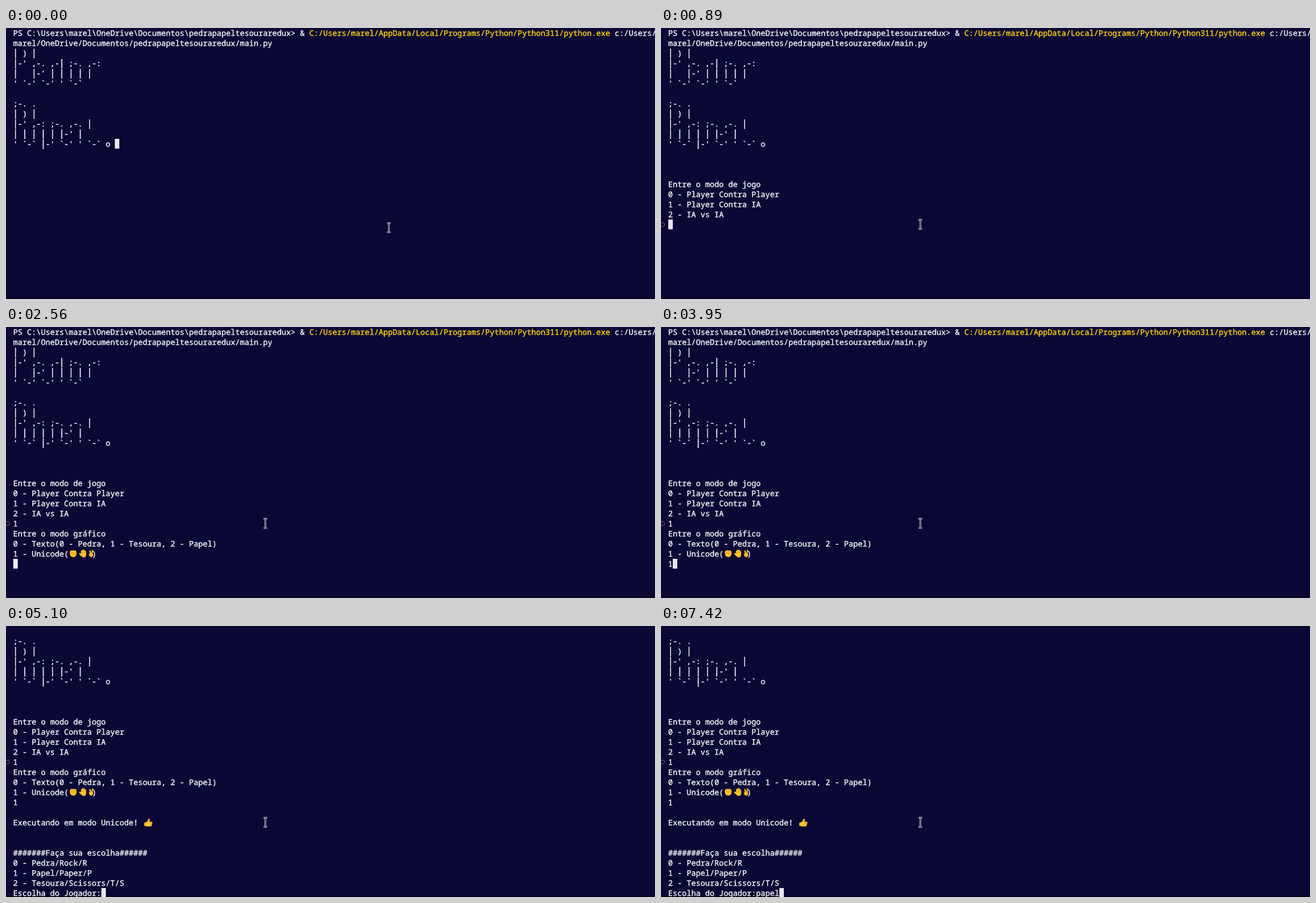
Write an HTML page that moves like this. It is 1157x484 px and loops after 8000 ms.

```html
<!DOCTYPE html>
<html lang="pt">
<head>
<meta charset="utf-8">
<title>Terminal</title>
<style>
  html, body { margin: 0; width: 100%; height: 100%; overflow: hidden; background: #0c0835; }
  svg { display: block; }
  text {
    font: 13.75px "Noto Sans Mono", "DejaVu Sans Mono", monospace;
    font-variant-ligatures: none;
    text-rendering: geometricPrecision;
    white-space: pre;
    fill: #f6f5fa;
    stroke: #f6f5fa;
    stroke-width: .4px;
  }
  text.bar { font-size: 16.5px; text-anchor: middle; }
  text.path { fill: #ffd40c; stroke: #ffd40c; }
  #caret text { fill: #0c0835; stroke: #0c0835; }
</style>
</head>
<body>
<svg id="stage" width="1157" height="484" viewBox="0 0 1157 484">
  <defs>
    <g id="fist">
      <path d="M2 6Q2 3.4 4.6 3H10.8Q13.6 3.2 13.8 6V9.6Q13.4 14.6 8.4 15Q3 14.8 2.2 10Z" fill="#ffc22e"/>
      <path d="M5 4V6.8M7.9 4V6.8M10.8 4V6.8M3.6 8.2H9.4Q10.4 10.2 8.2 10.8" fill="none" stroke="#d98a10" stroke-width=".8"/>
    </g>
    <g id="palm" fill="none" stroke="#ffc22e" stroke-width="2.6" stroke-linecap="round">
      <path d="M6.7 9V4.4M9 8V2.8M11.2 8V3.2M13.3 9.4V5.4M6 12L3.4 9"/>
      <path d="M5.4 8H14.6V11.2Q14 15.4 10.3 15.4Q7.4 15.4 5 12Z" fill="#ffc22e" stroke="none"/>
      <path d="M7.9 8V4.6M10.1 8V3.4M12.3 8.4V5" stroke="#d98a10" stroke-width=".6"/>
    </g>
    <g id="peace" fill="none" stroke="#ffc22e" stroke-width="2.3" stroke-linecap="round">
      <path d="M6 9L4.8 4M8.2 9L9.6 3"/>
      <path d="M3 9.6Q3 8.2 5 8.2H9Q10.8 8.4 10.6 11Q10 15 7 15Q3 14.4 3 9.6Z" fill="#ffc22e" stroke="none"/>
      <path d="M4 10.2H7.4Q8.4 11.4 6.6 12.4" stroke="#d98a10" stroke-width=".8"/>
    </g>
    <g id="thumb">
      <path d="M2.6 9.6L6 8.6Q9.4 6.4 10 3Q10.6 1.6 12 2.4Q13.6 3.8 11.8 7.4H15.8Q17.4 7.6 17.2 9.2L16 14.6Q15.4 16 13.8 16H7.6L2.6 14.8Z" fill="#ffc22e"/>
      <path d="M12.6 9.7H16.4M12.2 11.8H16M11.8 13.9H15.4" stroke="#d98a10" stroke-width=".7"/>
    </g>
    <path id="beam" d="M-3.2 -8.2H-1.5L0 -7.2L1.5 -8.2H3.2M0 -7.2V7.2M-3.2 8.2H-1.5L0 7.2L1.5 8.2H3.2"/>
  </defs>
  <rect y="482" width="1157" height="2" fill="#060318"/>
  <g id="screen">
    <g id="rows"></g>
    <g id="caret"><rect width="8" height="17.5" fill="#e9e7f6"/><text y="14"></text></g>
  </g>
  <g id="mouse" fill="none">
    <use href="#beam" stroke="#dddce6" stroke-width="2.8"/>
    <use href="#beam" stroke="#08061c" stroke-width="1"/>
  </g>
</svg>
<script>
const LOOP = 8000, LEFT = 12.8, CELL = 8.25, LINE = 18;
const PROMPT = "PS C:\\Users\\marel\\OneDrive\\Documentos\\pedrapapeltesouraredux> & ";
const EXE = "C:/Users/marel/AppData/Local/Programs/Python/Python311/python.exe";
const lines = [
  PROMPT + " ".repeat(EXE.length) + " c:/Users/",
  "marel/OneDrive/Documentos/pedrapapeltesouraredux/main.py",
  "| ) |",
  "|-' ,-. ,-| ;-. ,-:",
  "|   |-' | | | | |",
  "' `-' `-' ' `-`",
  "",
  ";-. .",
  "| ) |",
  "|-' ,-: ;-. ,-. |",
  "| | | | | |-' |",
  "' `-` |-' `-' ' `-` o",
  "", "", "",
  "Entre o modo de jogo",
  "0 - Player Contra Player",
  "1 - Player Contra IA",
  "2 - IA vs IA",
  "",
  "Entre o modo gráfico",
  "0 - Texto(0 - Pedra, 1 - Tesoura, 2 - Papel)",
  "1 - Unicode(     )",
  "",
  "",
  "Executando em modo Unicode!",
  "", "",
  "#######Faça sua escolha######",
  "0 - Pedra/Rock/R",
  "1 - Papel/Paper/P",
  "2 - Tesoura/Scissors/T/S",
  "Escolha do Jogador:"
];

// time, last row printed, rows scrolled, caret row, caret column
const states = [
  [0, 11, 0, 11, 22],
  [70, 19, 0, 19, 0],
  [2560, 23, 0, 23, 0],
  [5030, 31, 5, 31, 0],
  [5100, 32, 6, 32, 19]
];
// row, keys, press times
const typing = [
  [19, "1", [1750]],
  [23, "1", [3950]],
  [32, "papel", [7020, 7110, 7190, 7280, 7420]]
];
// time, x, y
const moves = [
  [0, 682.5, 356.5], [410, 673, 356], [490, 632, 355], [570, 568, 353],
  [650, 504, 350.5], [730, 466, 349], [810, 456, 348.5], [890, 462.3, 350.7]
];

const $ = id => document.getElementById(id);
const colX = c => LEFT + c * CELL;

function add(parent, tag, attrs, content = "") {
  const el = document.createElementNS("http://www.w3.org/2000/svg", tag);
  for (const k in attrs) el.setAttribute(k, attrs[k]);
  el.textContent = content;
  return parent.appendChild(el);
}

// Bars are set larger than the rest so that they nearly join between rows.
const rows = lines.map((line, r) => {
  const g = add($("rows"), "g", { transform: `translate(0 ${r * LINE})` });
  const text = add(g, "text", { x: LEFT, y: 14 }, line.replaceAll("|", " "));
  [...line].forEach((ch, c) => {
    if (ch === "|") add(g, "text", { class: "bar", x: colX(c + 0.5), y: 14 }, ch);
  });
  return { g, text };
});

add(rows[0].g, "text", { class: "path", x: colX(PROMPT.length), y: 14 }, EXE);
add(rows[19].g, "circle", { cx: 2.8, cy: 9, r: 3.6, fill: "none", stroke: "#4b485f", "stroke-width": 1.5 });

function emoji(r, name, c) {
  const el = add(rows[r].g, "use", { href: "#" + name, x: colX(c) });
  rows[r].g.insertBefore(el, rows[r].text);
}
emoji(22, "fist", 12);
emoji(22, "palm", 14);
emoji(22, "peace", 16);
emoji(25, "thumb", 28);

const current = (table, t) => table.findLast(step => step[0] <= t);

function draw(t) {
  const [, last, scroll, caretRow, col] = current(states, t);
  let caretCol = col;
  rows.forEach(({ g }, r) => g.setAttribute("visibility", r <= last ? "visible" : "hidden"));
  for (const [r, keys, times] of typing) {
    const n = times.filter(at => at <= t).length;
    rows[r].text.textContent = lines[r] + keys.slice(0, n);
    if (r === caretRow) caretCol += n;
  }
  $("screen").setAttribute("transform", `translate(0 ${-scroll * LINE})`);
  $("caret").setAttribute("transform", `translate(${Math.round(colX(caretCol))} ${caretRow * LINE})`);
  $("caret").lastElementChild.textContent = lines[caretRow][caretCol] || "";
  const [, x, y] = current(moves, t);
  $("mouse").setAttribute("transform", `translate(${x} ${y})`);
}

const start = performance.now();
function tick() {
  draw((performance.now() - start) % LOOP);
  requestAnimationFrame(tick);
}
tick();
</script>
</body>
</html>
```
